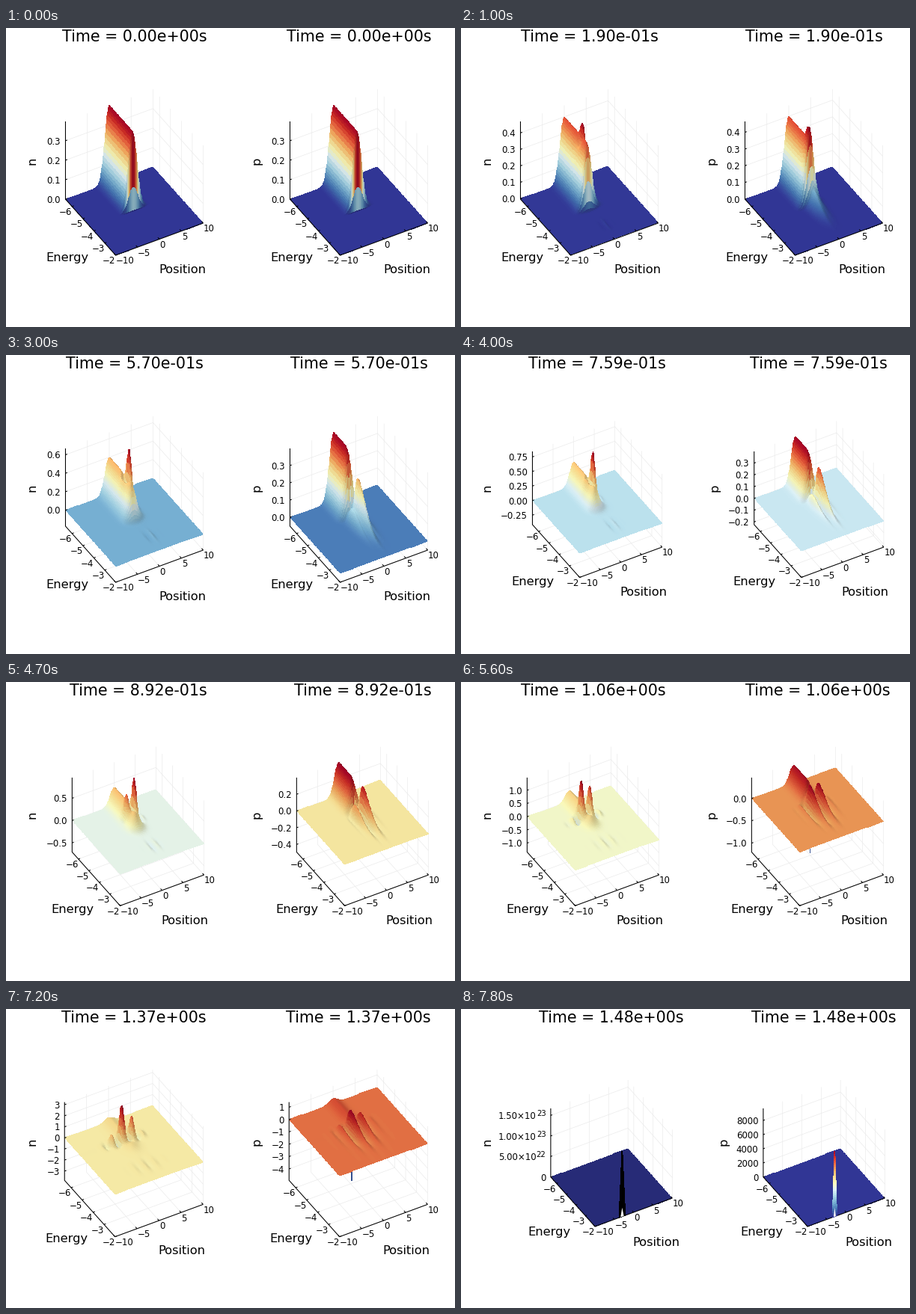
A matplotlib script for the animation above (7900 ms loop, 600 by 400 pixels).

```python
import numpy as np
import matplotlib.pyplot as plt
from matplotlib.animation import FuncAnimation
from matplotlib.collections import LineCollection, PolyCollection

FRAMES, STEP_MS = 79, 100
TICK, GUIDE, TITLE = 11.8, 16.2, 20.6      # font sizes in px
E_MIN, E_MAX, FERMI = -6.6, -2.0, -4.42
BLOWUP = FRAMES - 4                        # one point runs away from here on

plt.rcParams["font.family"] = "DejaVu Sans"
cmap = plt.get_cmap("RdYlBu_r")
fig = plt.figure(figsize=(6, 4), dpi=100, facecolor="white")
ax = fig.add_axes([0, 0, 1, 1])

# far to near, so nearer cells cover those behind
xs = np.r_[10, np.arange(6, -7.01, -0.1), -10]
es = np.linspace(E_MIN, E_MAX, 85)
X, E = np.meshgrid(xs, es)


def gauss(v, mid, width):
    return np.exp(-((v - mid) / width) ** 2)


def step_down(v, edge, width):
    return 1 / (1 + np.exp(np.clip((v - edge) / width, -60, 60)))


def ease(u):
    u = np.clip(u, 0, 1)
    return u * u * (3 - 2 * u)


def bell(x):
    return np.exp(-x * x / 2) / np.sqrt(2 * np.pi)


def surfaces(k):
    """Return (z, lo, hi) for n and for p."""
    if k >= BLOWUP:
        left = FRAMES - 1 - k
        flat = np.zeros_like(X)
        return (flat, 0, 1.67 * 10 ** (23 / 2 ** left)), (flat, 0, 9700 / 3.9 ** left)
    t = 1.5 * k / FRAMES

    # a wave grows along the position axis and drifts outward
    spread = ease((t - .75) / .5)
    peak, length = .4 + .92 * t, 1.6 + .55 * t
    ripple = gauss(X, .75 - .95 * spread, 1.1 + 1.4 * spread) * np.cos(
        2 * np.pi * (X - peak) / length)

    amp = .1 * (np.exp(2.5 * t) - np.exp(-6 * t))
    n = bell(X) * step_down(E, FERMI, .012 + .12 * t)
    n += amp * ripple * (gauss(E, -5.13, .22) + .03 * gauss(E, -3.1, .4))
    n_lo = -1.05 * max(t - .17, 0) * amp

    amp = .016 * (np.exp(3.35 * t) - 1)
    p = bell(X) * step_down(E, FERMI - .76 * ease(t / .45), .012 + .06 * ease(t / .4))
    tail = step_down(-E, 4.95, .07) * gauss(E, -4.95, 1.1)
    p += tail * (.28 * ease(t / .4) * np.exp(-.6 * t) * gauss(X, .6, 1.3) + amp * ripple)
    p_lo = -3.3 * max(t - .4, 0) * amp
    dip = gauss(X, peak - length / 2, .2) * gauss(E, -5.12, .1)
    p += (p_lo - p) * dip * ease((t - .4) / .3)

    return (np.maximum(n, n_lo), n_lo, n.max()), (np.maximum(p, p_lo), p_lo, p.max())


def z_ticks(lo, hi):
    span = hi - lo
    base = 10.0 ** np.floor(np.log10(span) - 1)
    for m, most in ((1, 7.9), (2, 5), (2.5, 6), (5, 7.9), (10, 7.9), (20, 5)):
        step = m * base
        if span / step <= most:
            break
    first, last = np.ceil(lo / step - 1e-6), np.floor(hi / step + 1e-6)
    return np.arange(first, last + 1) * step, step


def minus(s):
    return s.replace("-", "−")


def tick_label(v, step):
    """Return the label and its exponent, if any."""
    if step >= 1e4:
        if v == 0:
            return "0", ""
        e = int(np.floor(np.log10(v) + 1e-9))
        return f"{v / 10.0 ** e:.2f}×10", str(e)
    places = 0
    while abs(step * 10 ** places - round(step * 10 ** places)) > 1e-6:
        places += 1
    return minus(f"{v + 0.0:.{places}f}"), ""


def label_width(labels):
    if any(sup for _, sup in labels):
        return 62
    em = {".": .318, "−": .838}
    return TICK * max(sum(em.get(ch, .636) for ch in s) for s, _ in labels)


def text(x, y, s, size, ha="center", **kw):
    ax.text(x, y, s, fontsize=size * .72, ha=ha, va="baseline", color="black", **kw)


def lit_colors(z, lo, hi, dim):
    zn = (z - lo) / (hi - lo)
    ge, gx = np.gradient(zn, (es - E_MIN) / (E_MAX - E_MIN), xs / 20)
    light = (.5 * gx + .2 * ge + .84) / np.sqrt(gx ** 2 + ge ** 2 + 1) / .84
    shade = (.8 + .2 * np.clip(light, 0, 1)) * dim
    value = (zn[:-1, 1:] + zn[:-1, :-1]) / 2
    return cmap(value)[..., :3] * shade[:-1, :-1, None]


def spike(proj, half, paint):
    """A needle on the front edge with a gap at its foot."""
    a, top, levels = .352, .95, np.linspace(0, 1, 31)

    def rung(h):
        w = half * (1 - h) + .004
        return [proj(a - w, 0, h * top), proj(a + w, 0, h * top)]

    quads = [rung(h0) + rung(h1)[::-1] for h0, h1 in zip(levels[:-1], levels[1:])]
    ax.add_collection(PolyCollection(quads, facecolors=[paint(h) for h in levels[:-1]],
                                     edgecolors="none", antialiased=False, zorder=3))
    gap = [proj(a - half * .55, 0, 0), proj(a + half * .55, 0, 0), proj(a, 0, .13)]
    ax.add_collection(PolyCollection([gap], facecolors="white", zorder=4))


def panel(k, surf, ticks, c, s, guide, guide_x):
    z, lo, hi = surf
    values, labels = ticks

    def proj(a, b, h):
        return (c + s * (-25 + 117 * a - 67 * b),
                193 + s * (111 - 43 * a - 75 * b - 104 * h))

    def fx(x):
        return (x + 10) / 20

    def fe(e):
        return (E_MAX - e) / (E_MAX - E_MIN)

    def fz(v):
        return (v - lo) / (hi - lo)

    grid, marks = [], []
    for x in range(-10, 11, 5):
        a = fx(x)
        grid.append([proj(a, 0, 0), proj(a, 1, 0), proj(a, 1, 1)])
        marks.append([proj(a, 0, 0), proj(a, .03, 0)])
        px, py = proj(a, 0, 0)
        text(px + .5, py + 7 + .365 * TICK, minus(str(x)), TICK, "left")
    for e in range(-6, -1):
        b = fe(e)
        grid.append([proj(0, b, 0), proj(1, b, 0), proj(1, b, 1)])
        marks.append([proj(0, b, 0), proj(.02, b, 0)])
        px, py = proj(0, b, 0)
        text(px, py + 7 + .365 * TICK, minus(str(e)), TICK, "right")
    for v, (base, sup) in zip(values, labels):
        h = fz(v)
        grid.append([proj(0, 1, h), proj(1, 1, h), proj(1, 0, h)])
        marks.append([proj(0, 1, h), proj(.02, 1, h)])
        px, py = proj(0, 1, h)
        py += .5 + .365 * TICK
        text(px - (19 if sup else 6.5), py, base, TICK, "right")
        text(px - 6.5, py - 4, sup, 10, "right")
    ax.add_collection(LineCollection(grid, colors="0.92", linewidths=.5, zorder=0))

    runaway = k >= BLOWUP
    black = runaway and guide == "n"
    dim = .8 if black else 1 - .2 * max(fz(0) - .35, 0)
    sx, sy = proj(fx(X), fe(E), fz(z))
    ax.pcolormesh(sx, sy, lit_colors(z, lo, hi, dim), shading="flat",
                  antialiased=False, edgecolors="none", linewidth=0, zorder=1)
    if runaway:
        spike(proj, .038 if black else .026, (lambda h: "black") if black else cmap)

    axes = [[proj(0, 1, 1), proj(0, 1, 0), proj(0, 0, 0), proj(1, 0, 0)]]
    ax.add_collection(LineCollection(axes + marks, colors="black",
                                     linewidths=.75, zorder=2))
    ex, ey = proj(0, .5, 0)
    text(ex - 31.5, ey + 45.5, "Energy", GUIDE)
    px, py = proj(.5, 0, 0)
    text(px + 30.5, py + 45, "Position", GUIDE)
    text(guide_x, 177.5, guide, GUIDE, rotation=90, rotation_mode="anchor")
    text(c, 18.5, f"Time = {1.5 * k / FRAMES:.2e}s", TITLE)


def draw(k):
    ax.cla()
    ax.axis("off")
    surfs = surfaces(k)
    ticks = []
    for _, lo, hi in surfs:
        values, step = z_ticks(lo, hi)
        ticks.append((values, [tick_label(v, step) for v in values]))
    # both panels share the width left over by their tick labels
    pads = [label_width(labels) for _, labels in ticks]
    width = 232 - (sum(pads) - 37.6) / 2
    left = 36.7
    for surf, tick, pad, guide in zip(surfs, ticks, pads, "np"):
        panel(k, surf, tick, left + pad + width / 2, width / 232, guide, left + 2.8)
        left += pad + width + 49.2
    ax.set_xlim(0, 600)
    ax.set_ylim(400, 0)
    return []


anim = FuncAnimation(fig, draw, frames=FRAMES, interval=STEP_MS,
                     init_func=lambda: [], repeat=True, repeat_delay=0)
plt.show()
```
